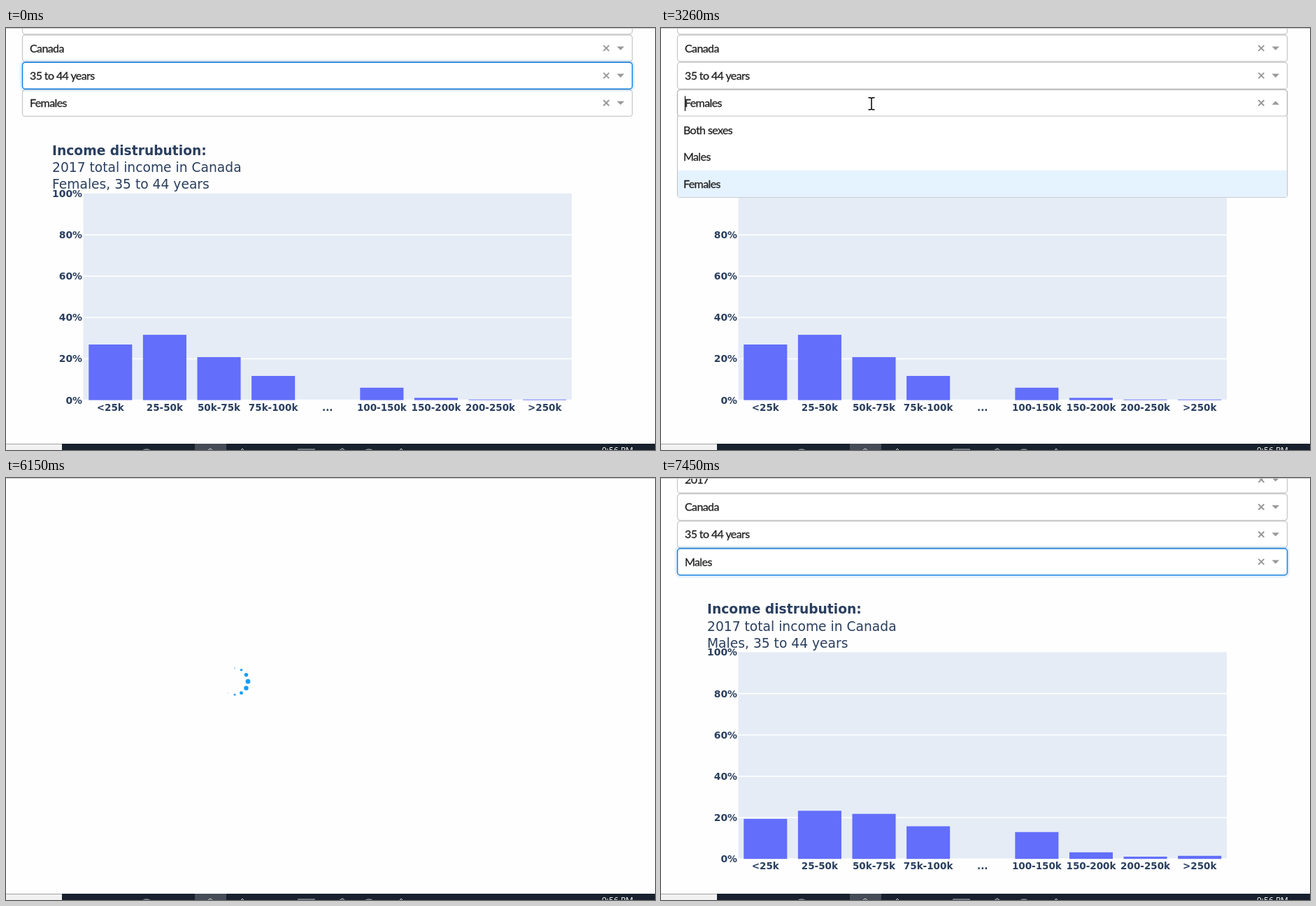
These frames come from a looping animation (928 by 604 pixels, 8000 ms). An HTML page:

```html
<!DOCTYPE html>
<html lang="en">
<head>
<meta charset="utf-8">
<title>Income distribution</title>
<style>
html, body { margin: 0; width: 100%; height: 100%; overflow: hidden; background: #fefefe; }
svg { display: block; width: 928px; height: 604px; }
text { white-space: pre; }
.head { font: bold 30px Lato, sans-serif; fill: #fefefe; stroke: #3a3a3a; stroke-width: .9; }
.field { font: 16px Lato, sans-serif; letter-spacing: -.6px; fill: #222; stroke: #222; stroke-width: .3; }
.title { font: 18.7px "DejaVu Sans", sans-serif; fill: #2a3f5f; }
.tick { font: bold 13.5px "DejaVu Sans", sans-serif; fill: #2a3f5f; text-anchor: middle; }
.pct { font-size: 13.9px; text-anchor: end; }
.clock { font: 12px "Open Sans", sans-serif; fill: #fff; }
.tools { fill: none; stroke: #b4b4b4; stroke-width: 2; }
.bold { font-weight: bold; }
</style>
</head>
<body>
<svg viewBox="0 0 928 604">
  <rect width="928" height="604" fill="#fefefe"/>
  <g id="page"></g>
  <g id="overlay"></g>
  <path d="M0 .5H928" stroke="#c9c9c9"/>
  <g id="taskbar">
    <rect y="595" width="928" height="9" fill="#18212d"/>
    <rect y="595" width="80" height="9" fill="#f1f1f1"/>
    <path d="M0 595.5H80" stroke="#a5a5a5"/>
    <rect x="270" y="595" width="45" height="9" fill="#454b57"/>
    <g fill="none" stroke="#8b9099" stroke-width="1.5">
      <circle cx="201" cy="612" r="9"/>
      <circle cx="519" cy="612" r="9"/>
      <path d="M418 605V603H441V605M476 605L481 602L485 605"/>
    </g>
    <path d="M289 604L292 602L295 604M336 604L338 602L340 604M563 604L565 602L567 604" stroke="#d5d8dc" fill="none"/>
    <text class="clock" x="852" y="609">9:56 PM</text>
  </g>
</svg>
<script>
const LOOP = 8000;
const LEFT = 110.5, TOP = 334, HEIGHT = 295.8;
const bands = ['&lt;25k', '25-50k', '50k-75k', '75k-100k', '...', '100-150k', '150-200k', '200-250k', '>250k'];
const shares = {
  Females: [26.9, 31.6, 20.8, 11.7, 0, 6, 1.1, .3, .3],
  Males: [19.4, 23.3, 21.8, 15.8, 0, 13, 3.2, 1.1, 1.5]
};

// Each step overrides part of the screen state from the given time on.
const steps = [
  [0, { sex: 'Females', scroll: 97.2, width: 698.5, focus: 2 }],
  [460, { tools: .5, cursor: ['cross', 566, 271] }],
  [530, { tools: 1 }],
  [910, { cursor: ['arrow', 600, 193] }],
  [1380, { tools: 0, cursor: ['beam', 395, 108] }],
  [1860, { cursor: ['beam', 349, 62] }],
  [2330, { cursor: ['beam', 311, 104] }],
  [2800, { focus: -1, open: true, option: 2, cursor: ['beam', 306, 102] }],
  [2890, { caret: true }],
  [3260, { cursor: ['beam', 301, 108] }],
  [3340, { option: 0, cursor: ['hand', 270, 140] }],
  [3720, { option: 1, caret: false, cursor: ['hand', 241, 172] }],
  [4190, { loading: true, open: false, cursor: ['arrow', 241, 172] }],
  [4270, {}],
  [4650, { cursor: ['arrow', 399, 179] }],
  [4730, {}],
  [5130, { cursor: null }],
  [5200, {}], [5600, {}], [5670, {}], [6070, {}], [6150, {}],
  [6530, { loading: false, sex: 'Males', scroll: 0, width: 715, focus: 3 }],
  [6990, { scroll: 18 }],
  [7070, { width: 698.5 }],
  [7450, { scroll: 84.6 }]
];
let last = {};
const states = steps.map(([at, change]) => last = { ...last, ...change, at });

const text = (cls, x, y, s) => `<text class="${cls}" x="${x}" y="${y}">${s}</text>`;
const rect = (x, y, w, h, fill, more = '') =>
  `<rect x="${x}" y="${y}" width="${w}" height="${h}" fill="${fill}" ${more}/>`;

function field(i, label, s) {
  const cy = 86.9 + i * 39.2, y = cy - 18.9;
  const focused = i === s.focus, open = s.open && i === 3;
  const halo = focused
    ? rect(21.3, y - 2.2, 876, 42.2, 'none', 'rx="6" stroke="#007eff" stroke-opacity=".1" stroke-width="3.4"') : '';
  const color = focused ? '#1580e0' : open ? '#b3b3b3' : '#c8c8c8';
  const dir = open ? -1 : 1;
  return halo
    + rect(23.5, y, 872, 38, '#fff', `rx="4" stroke="${color}" stroke-width="${focused ? 1.5 : 1.3}"`)
    + text('field', 34, cy + 5.8, label)
    + `<path d="M854.3 ${cy - 4}l8 8m0-8l-8 8" stroke="#999" stroke-width="2"/>`
    + `<path d="M873.5 ${cy - 2.5 * dir}h10.6l-5.3 ${5.3 * dir}z" fill="#999"/>`;
}

function menu(s) {
  const y = 223.6, row = 38.7;
  let out = `<path d="M23.5 ${y}H895.5V${y + 112}q0 4-4 4H27.5q-4 0-4-4Z" fill="#fff" stroke="#c4c4c4" stroke-width="1.2"/>`
    + rect(24, y + s.option * row, 871, row - .3, '#e5f2ff')
    + `<path d="M24 ${y}H895" stroke="#e0e0e0"/>`;
  ['Both sexes', 'Males', 'Females'].forEach((label, i) => {
    out += text('field', 32, y + (i + .5) * row + 5.8, label);
  });
  if (s.caret) out += '<path d="M34.5 194.5v21.5" stroke="#000" stroke-width="1.2"/>';
  return out;
}

function chart(s) {
  const cell = s.width / 9, bottom = TOP + HEIGHT, x0 = s.width > 700 ? 67 : 66;
  let out = rect(LEFT, TOP, s.width, HEIGHT, '#e5ecf6');
  for (let p = 0; p <= 100; p += 20) {
    const y = bottom - p / 100 * HEIGHT;
    if (p < 100) out += rect(LEFT, y - .8, s.width, 1.6, '#fff');
    out += text('tick pct', 109, y + 5, p + '%');
  }
  shares[s.sex].forEach((v, i) => {
    const x = LEFT + i * cell, h = v / 100 * HEIGHT;
    out += rect(x + cell * .1, bottom - h, cell * .8, h, '#636efa')
      + text('tick', x + cell / 2, bottom + 15, bands[i]);
  });
  return out
    + text('title bold', x0, TOP - 55, 'Income distrubution:')
    + text('title', x0, TOP - 30.7, '2017 total income in Canada')
    + text('title', x0, TOP - 6.6, s.sex + ', 35 to 44 years');
}

function spinner(at) {
  let out = '';
  const phase = .045 + (at - 4190) / 1200;
  const count = at < 4270 ? 10 : 12;
  for (let n = 0; n < count; n++) {
    const p = (phase - n / 12 + 2) % 1;
    const u = Math.max(0, 1 - Math.abs(p - .4) / .4);
    const a = n * Math.PI / 6;
    out += `<circle cx="${327 + 19 * Math.sin(a)}" cy="${291.2 - 19 * Math.cos(a)}" r="${3.4 * u * u * (3 - 2 * u)}" fill="#119dff"/>`;
  }
  return out;
}

const icons = [
  'M1 4H15V14H1ZM6 9h4', 'M2 7a5 5 0 1 0 10 0a5 5 0 1 0-10 0M11 11l4 4',
  'M8 1V15M1 8H15', 'M2 2h4m4 0h4v4m0 4v4h-4m-4 0H2v-4m0-4V2',
  'M2 6a6 4 0 1 0 12 0a6 4 0 1 0-12 0M4 9v5', 'M2 2H14V14H2ZM8 5v6M5 8h6',
  'M2 2H14V14H2ZM5 8h6', 'M2 6V2h4M14 10v4h-4M2 2L14 14', 'M1 9L8 2L15 9M3 8v6H13V8',
  'M2 2V14H14M5 11l6-6', 'M2 8L6 4H14V12H6Z', 'M2 5L5 2H14V7H5ZM2 12L5 9H14V14H5Z', 'M3 3H13V13H3Z'
];
const groups = [0, 1, 1, 2, 2, 3, 3, 3, 3, 4, 4, 4, 5];

const toolbar = opacity => `<g class="tools" opacity="${opacity}">` + icons.map((d, i) =>
  `<path transform="translate(${524 + i * 25 + groups[i] * 9} 139)" d="${d}"/>`).join('') + '</g>';

const cursors = {
  arrow: '<path d="M.5.5V16L4 12.7L6.5 18L9 17L6.7 11.7H11.7Z" fill="#fff" stroke="#111"/>',
  beam: '<path d="M-4.5-8.2H-1.2L0-7.2L1.2-8.2H4.5M0-7.2V7.8M-4.5 8.8H-1.2L0 7.8L1.2 8.8H4.5" fill="none" stroke="#000" stroke-width="1.5"/>',
  cross: '<path d="M-9 0H9M0-9V9" stroke="#000" stroke-width="1.4"/>',
  hand: '<path d="M-1.5 13V1.5Q0-.5 1.5 1.5V8Q4 6.5 5 8.5Q7 7.5 8 9.5Q10.5 9 10.5 11V15L8.5 21H0L-5 13.5Q-4.5 10.5-1.5 13" fill="#fff" stroke="#111"/>'
};

const page = document.getElementById('page');
const overlay = document.getElementById('overlay');

function draw(s) {
  page.setAttribute('transform', `translate(0 ${-s.scroll})`);
  const labels = ['2017', 'Canada', '35 to 44 years', s.sex];
  const order = [0, 1, 2, 3].sort((a, b) => (a === s.focus) - (b === s.focus));
  page.innerHTML = s.loading ? '' :
    text('head', 22, 50, 'Income distribution')
    + order.map(i => field(i, labels[i], s)).join('')
    + chart(s) + (s.open ? menu(s) : '');
  let top = s.loading ? spinner(s.at) : '';
  if (s.tools) top += toolbar(s.tools);
  if (s.cursor) {
    const [kind, x, y] = s.cursor;
    top += `<g transform="translate(${x} ${y})">${cursors[kind]}</g>`;
  }
  overlay.innerHTML = top;
}

let start, shown;
function tick(now) {
  start ??= now;
  const t = (now - start) % LOOP;
  const s = states.findLast(state => state.at <= t) || states[0];
  if (s !== shown) draw(shown = s);
  requestAnimationFrame(tick);
}
draw(shown = states[0]);
requestAnimationFrame(tick);
</script>
</body>
</html>
```
